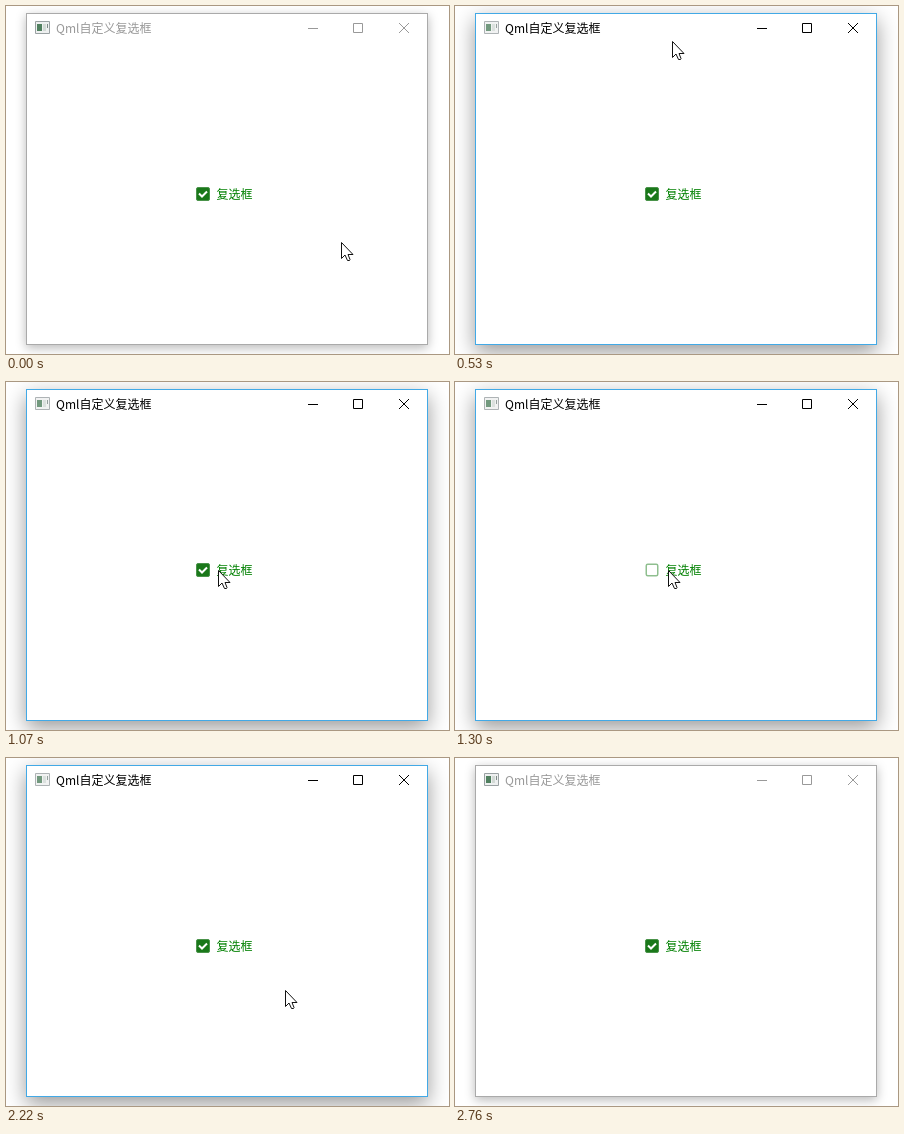
Animation, 443 px wide and 348 px high, one loop 2.84 s. Source, as an HTML page:

```html
<!DOCTYPE html>
<html lang="zh">
<head>
<meta charset="utf-8">
<style>
  html, body { margin: 0; width: 100%; height: 100%; overflow: hidden; background: #fff; }
  #window {
    position: absolute; left: 20px; top: 7px; width: 402px; height: 332px;
    box-sizing: border-box; background: #fff; border: 1px solid #aaa;
    box-shadow: 0 3px 10px rgba(0, 0, 0, .28);
    --ink: #999;
  }
  #window.active {
    border-color: #42a9e6; box-shadow: 0 7px 20px rgba(0, 0, 0, .4);
    --ink: #000;
  }
  svg { position: absolute; left: -21px; top: -8px; }
  text { font: 12px "Noto Sans CJK SC", "Noto Sans CJK", sans-serif; }
  #title { fill: var(--ink); }
  #buttons { fill: none; stroke: var(--ink); }
  .active #icon { opacity: .8; }
</style>
</head>
<body>
<div id="window">
  <svg width="443" height="348" viewBox="0 0 443 348">
    <g id="icon">
      <path d="M29.5 15.5h14v12h-14z" fill="#eef0f0" stroke="#9aa1a3"/>
      <path d="M31 18h5v7h-5z" fill="#50805f"/>
      <path d="M37 18h3v7h-3z" fill="#d3dad6"/>
      <path d="M41 18h1v4h-1z" fill="#7d8a86"/>
    </g>
    <text id="title" x="50" y="27">Qml自定义复选框</text>
    <path id="buttons" d="M302 22.5h10M347.5 17.5h9v9h-9zM393 17l10 10m0-10l-10 10"/>
    <g id="checkbox">
      <rect id="empty" x="191.25" y="182.25" width="11.5" height="11.5" rx="1.5" fill="#fff" stroke="#8fbf8f" stroke-width="1.5"/>
      <g id="checked">
        <rect x="190.5" y="181.5" width="13" height="13" rx="1.5" fill="#1a781a" stroke="#4a934a"/>
        <path d="M193 187.5l3 3 5-5" fill="none" stroke="#fff" stroke-width="2"/>
      </g>
      <text x="210.5" y="192.5" fill="#008000">复选框</text>
    </g>
    <path id="cursor" d="M.5.5V16.5L4 13 6.5 18.5H8.5L9 17.5 7 12.5H12Z" fill="#fff" stroke="#111"/>
  </svg>
</div>
<script>
const LOOP = 2840, STEPS = 37, STEP_LEAD = 11;
const $ = id => document.getElementById(id);
const between = (t, from, to) => t >= from && t < to;
const ease = p => (1 - Math.cos(Math.PI * p)) / 2;

// The pointer eases from one key point to the next in discrete steps.
const path = [
  { step: 0, x: 335, y: 236 },
  { step: 6, x: 217, y: 35 },
  { step: 8, x: 217, y: 35 },
  { step: 11, x: 204, y: 189 },
  { step: 15, x: 213, y: 188 },
  { step: 28, x: 213, y: 188 },
  { step: 29, x: 279, y: 232 },
  { step: 33, x: 408, y: 334 },
  { step: 34, x: 460, y: 380 }
];

function pointerAt(t) {
  const step = Math.floor((t + STEP_LEAD) * STEPS / LOOP);
  const next = path.findIndex(point => point.step > step);
  if (next < 0) return path.at(-1);
  const from = path[next - 1], to = path[next];
  const p = ease((step - from.step) / (to.step - from.step));
  const mix = axis => Math.round(from[axis] + (to[axis] - from[axis]) * p);
  return { x: mix('x'), y: mix('y') };
}

function draw(t) {
  const { x, y } = pointerAt(t);
  $('cursor').setAttribute('transform', `translate(${x} ${y})`);
  $('window').classList.toggle('active', between(t, 530, 2760));
  const isChecked = !between(t, 1300, 1760);
  const isPressed = between(t, 1220, 1300) || between(t, 1680, 1760);
  $('checked').style.display = isChecked ? '' : 'none';
  $('empty').style.display = isChecked ? 'none' : '';
  $('checkbox').style.opacity = isPressed ? .6 : 1;
}

const startTime = performance.now();
function tick() {
  draw((performance.now() - startTime) % LOOP);
  requestAnimationFrame(tick);
}
tick();
</script>
</body>
</html>
```
